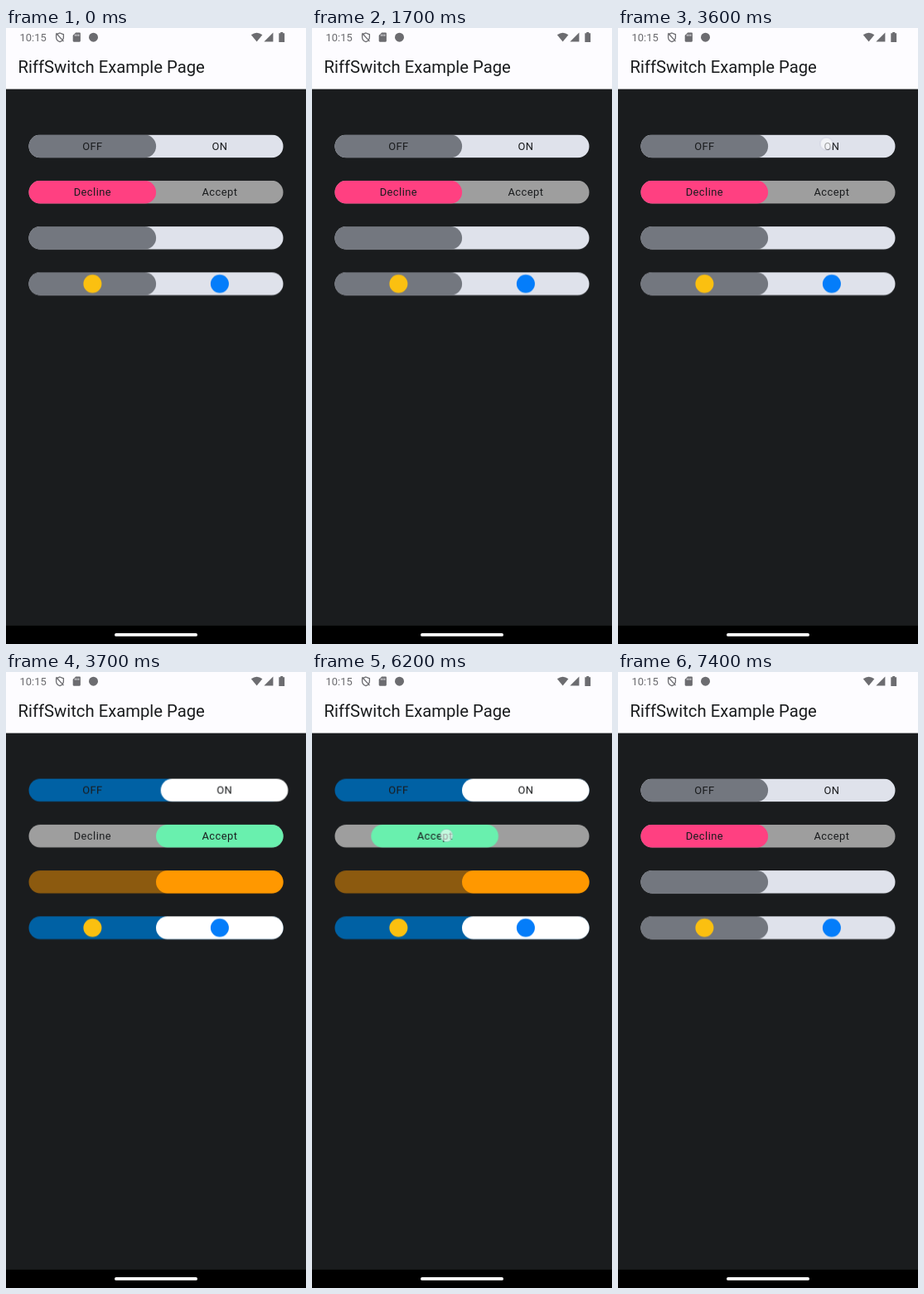
An HTML page for the animation above (8 s loop, 362 px wide and 742 px high).

```html
<!DOCTYPE html>
<html lang="en">
<head>
<meta charset="utf-8">
<title>RiffSwitch Example Page</title>
<style>
  html, body { margin: 0; width: 100%; height: 100%; overflow: hidden; background: #1a1c1e; }
  svg { display: block; width: 362px; height: 742px; font-family: Roboto, sans-serif; }

  .status { fill: #6c6c70; }
  .title { font-size: 20.26px; fill: #1a1c1e; }
  .label { font-size: 12.9px; letter-spacing: .46px; fill: #1a1c1e; text-anchor: middle; }

  .track, .thumb { height: 27.6px; rx: 13.8px; }
  .track { width: 307px; }
  .thumb { width: 153.6px; }

  .off, .on, .touch, .spring, .drag { animation: 8s infinite; }
  .off { animation-name: off; animation-timing-function: step-end; }
  .on { animation-name: on; animation-timing-function: step-end; }
  .touch { animation-name: show, move; animation-duration: 8s; animation-iteration-count: infinite;
           animation-timing-function: step-end, linear; }
  .spring { animation-name: spring; animation-timing-function: ease-out; }
  .drag { animation-name: drag; animation-timing-function: linear; }

  @keyframes off { 0% { opacity: 1 } 45.75% { opacity: 0 } 89.5%, 100% { opacity: 1 } }
  @keyframes on { 0% { opacity: 0 } 45.75% { opacity: 1 } 89.5%, 100% { opacity: 0 } }
  @keyframes spring {
    0%, 46.9% { transform: translateX(5.7px) }
    48.75%, 100% { transform: none }
  }
  @keyframes drag {
    0%, 71.9% { transform: none }
    79.75%, 100% { transform: translateX(-153.4px) }
  }
  @keyframes show {
    0% { opacity: 0 }
    41% { opacity: 1 }
    45.75% { opacity: 0 }
    66% { opacity: 1 }
    89.5%, 100% { opacity: 0 }
  }
  @keyframes move {
    0%, 46% { transform: translate(251.5px, 139.5px) }
    46.01%, 69.9% { transform: translate(216px, 192.5px) }
    71.25% { transform: translate(206px, 194px) }
    80% { transform: translate(145px, 198px) }
    87.5%, 100% { transform: translate(100px, 204px) }
  }
</style>
</head>
<body>
<svg viewBox="0 0 362 742">
  <rect width="362" height="742" fill="#1a1c1e"/>
  <rect width="362" height="73.6" fill="#fdfcff"/>
  <rect y="719.9" width="362" height="22.1" fill="#000"/>
  <rect x="131" y="729" width="100" height="3.8" rx="1.9" fill="#fff"/>

  <g class="status">
    <text x="16.6" y="16.2" font-size="12.9">10:15</text>
    <path d="M65 6l4.4 1.8v3.4q0 3.9-4.4 5.4q-4.4-1.5-4.4-5.4V7.8zM60.5 6.3l9 9.8" fill="none" stroke="#6c6c70" stroke-width="1.3"/>
    <path d="M84.2 5.5h4.6q1.1 0 1.1 1.1v9q0 1.1-1.1 1.1h-7q-1.1 0-1.1-1.1V9z"/>
    <path d="M83.6 7.6v2.2M85.7 7.6v2.2M87.8 7.6v2.2" stroke="#fdfcff" stroke-width=".9"/>
    <circle cx="105.5" cy="11.2" r="5.5"/>
    <path d="M302.6 16.4l-6.8-8.2q6.8-5 13.6 0z"/>
    <path d="M322.4 5.6v11h-11z"/>
    <path d="M331.2 6.3v-1.2h3v1.2h1.9v10.6h-6.8V6.3z"/>
  </g>
  <text class="title" x="14.6" y="54.3">RiffSwitch Example Page</text>

  <g id="rows"></g>

  <g class="touch">
    <circle r="7.6" fill="#fff" fill-opacity=".6" stroke="#8c8cb4" stroke-opacity=".28"/>
  </g>
</svg>
<script>
  const LEFT = 27.5, MID = 181, TOP = 128.6, PITCH = 55.25;

  const text = s => x => `<text class="label" x="${x}" y="18.4">${s}</text>`;
  const dot = color => x => `<circle cx="${x}" cy="13.8" r="11" fill="${color}"/>`;
  const blank = () => '';

  const muted = ['#dfe2eb', '#73777f'];
  const blue = ['#0061a4', '#fff'];
  const rows = [
    { off: muted, on: blue, labels: [text('OFF'), text('ON')], motion: 'spring' },
    { off: ['#9e9e9e', '#ff4081'], on: ['#9e9e9e', '#69f0ae'], labels: [text('Decline'), text('Accept')], motion: 'drag' },
    { off: muted, on: ['#8c5a0f', '#ff9800'], labels: [blank, blank] },
    { off: muted, on: blue, labels: [dot('#fbc010'), dot('#047dfa')] }
  ];

  // The thumb carries the active label; the track shows the other one.
  function state(name, [track, thumb], labels, motion = '') {
    const parts = [labels[0](104.4), labels[1](257.9)];
    const active = name === 'on' ? 1 : 0;
    return `<g class="${name}">
      <rect class="track" x="${LEFT}" fill="${track}"/>${parts[1 - active]}
      <g class="${motion}">
        <rect class="thumb" x="${active ? MID : LEFT}" fill="${thumb}"/>${parts[active]}
      </g></g>`;
  }

  document.getElementById('rows').innerHTML = rows.map((r, i) =>
    `<g transform="translate(0 ${TOP + i * PITCH})">
      ${state('off', r.off, r.labels)}${state('on', r.on, r.labels, r.motion)}
    </g>`).join('');
</script>
</body>
</html>
```
